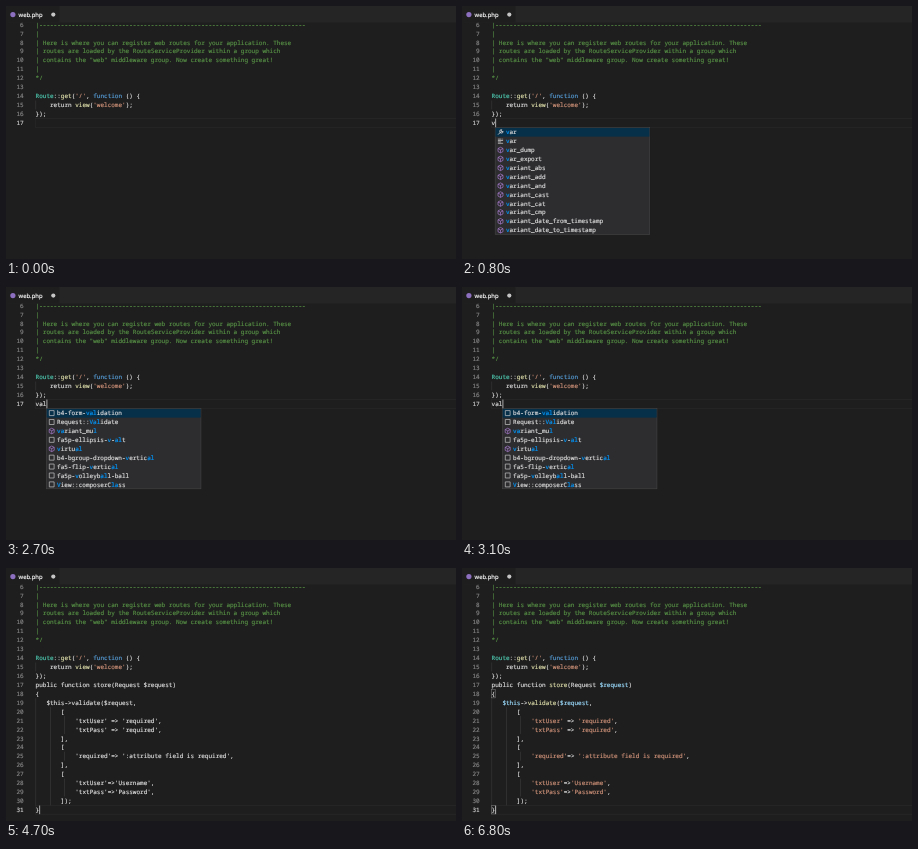
An HTML page for the animation above (6900 ms loop, 450x253 px).

```html
<!DOCTYPE html>
<html lang="en">
<head>
<meta charset="utf-8">
<title>Editor snippet</title>
<style>
html, body { margin: 0; width: 100%; height: 100%; overflow: hidden; background: #1e1e1e; }
svg { display: block; width: 100vw; height: 100vh; }
text { font: 6.01px "Noto Sans Mono", "DejaVu Sans Mono", monospace; white-space: pre; text-rendering: geometricPrecision; }
text, tspan { fill: currentColor; stroke: currentColor; stroke-width: 0.17px; }
.tab { font: 5.9px "Open Sans", "Noto Sans", sans-serif; }
</style>
</head>
<body>
<svg id="stage" viewBox="0 0 450 253"></svg>
<script>
const LOOP = 6900, LEFT = 29.6, CHAR = 3.606, ROW = 8.93;
const FG = '#dcdcdc', COMMENT = '#568f45', STRING = '#ce9178', GUIDE = '#404040';
const stage = document.getElementById('stage');

function add(parent, tag, attrs = {}, content) {
  const node = document.createElementNS('http://www.w3.org/2000/svg', tag);
  for (const key in attrs) node.setAttribute(key, attrs[key]);
  if (content !== undefined) node.textContent = content;
  parent.appendChild(node);
  return node;
}
const group = () => add(stage, 'g');
const rect = (parent, x, y, width, height, fill, more) =>
  add(parent, 'rect', { x, y, width, height, fill, ...more });
const mid = line => 18.6 + (line - 6) * ROW;
const col = n => LEFT + n * CHAR;
const show = (node, on) => node.setAttribute('visibility', on ? 'visible' : 'hidden');

function write(parent, x, y, parts) {
  const text = add(parent, 'text', { x, y });
  parts.forEach(([color, value]) => add(text, 'tspan', { color }, value));
}

const rules = [
  [/^'[^']*'/, () => STRING],
  [/^\$\w+/, () => '#9cdcfe'],
  [/^\w+/, (word, line) => {
    if (word === 'Route') return '#4ec9b0';
    if (/^(get|view|store|validate)$/.test(word)) return '#dcdcaa';
    if (word === 'function' && line === 14) return '#569cd6';
    return FG;
  }],
  [/^[^\w'$]+/, () => FG]
];

function tokens(source, line) {
  const parts = [];
  while (source) {
    const [pattern, color] = rules.find(([p]) => p.test(source));
    const value = source.match(pattern)[0];
    parts.push([color(value, line), value]);
    source = source.slice(value.length);
  }
  return parts;
}

function codeLine(parent, line, source, plainColor) {
  const code = source.trim();
  const parts = plainColor ? [[plainColor, code]] : tokens(code, line);
  write(parent, col(source.length - code.length), mid(line) + 2.1, parts);
}

function guide(parent, column, first, last) {
  rect(parent, col(column), mid(first) - ROW / 2, 0.5, (last - first + 1) * ROW, GUIDE);
}

function lineNumber(parent, line, color = '#858585') {
  add(parent, 'text', { x: 17.6, y: mid(line) + 2.1, 'text-anchor': 'end', color }, line);
}

function activeLine(parent, line) {
  rect(parent, LEFT - 0.3, mid(line) - 4.4, 430, 8.8, 'none', { stroke: '#292929', 'stroke-width': 0.7 });
  lineNumber(parent, line, '#d0d0d0');
}

// Base document
rect(stage, 0, 0, 450, 253, '#1e1e1e');
const base = group();
const opening = [
  '|' + '-'.repeat(74),
  '|',
  '| Here is where you can register web routes for your application. These',
  '| routes are loaded by the RouteServiceProvider within a group which',
  '| contains the "web" middleware group. Now create something great!',
  '|',
  '*/',
  '',
  "Route::get('/', function () {",
  "    return view('welcome');",
  '});'
];
opening.forEach((source, i) => {
  lineNumber(base, i + 6);
  if (source) codeLine(base, i + 6, source, i < 7 && COMMENT);
});
guide(base, 0, 15, 15);

// Line being typed
const typing = group();
activeLine(typing, 17);
const typed = add(typing, 'text', { x: LEFT, y: mid(17) + 2.1, color: FG });

// Inserted snippet: plain at first, coloured once parsed
const snippet = group(), plain = group(), colored = group();
activeLine(snippet, 31);
guide(snippet, 0, 19, 30);
guide(snippet, 4, 20, 30);
[[21, 22], [25, 25], [28, 29]].forEach(([a, b]) => guide(snippet, 8, a, b));
const body = [
  'public function store(Request $request)',
  '{',
  '   $this->validate($request,',
  '       [',
  "           'txtUser' => 'required',",
  "           'txtPass' => 'required',",
  '       ],',
  '       [',
  "           'required'=> ':attribute field is required',",
  '       ],',
  '       [',
  "           'txtUser'=>'Username',",
  "           'txtPass'=>'Password',",
  '       ]);',
  '}'
];
body.forEach((source, i) => {
  if (i < body.length - 1) lineNumber(snippet, i + 17);
  codeLine(plain, i + 17, source, FG);
  codeLine(colored, i + 17, source);
});
[18, 31].forEach(line => rect(colored, LEFT, mid(line) - 4.1, CHAR, 8.2, 'none',
  { stroke: '#888888', 'stroke-width': 0.5 }));

// Tab bar
rect(stage, 0, 0, 450, 16.5, '#252526');
rect(stage, 0, 0, 53.5, 16.5, '#1e1e1e');
add(stage, 'circle', { cx: 6.9, cy: 8.6, r: 2.6, fill: '#8d6fc0' });
add(stage, 'text', { x: 12.6, y: 10.8, color: '#ffffff', class: 'tab' }, 'web.php');
add(stage, 'circle', { cx: 47.3, cy: 8.6, r: 2.1, fill: '#c5c5c5' });

// Suggestion lists; matched letters are wrapped in <>
const icons = {
  wrench: ['M-2.4 2.4L.4-.4M1.2-2.5A1.7 1.7 0 1 0 2.6-.9L1.3-.3.5-1.1Z', '#d0d0d0', 0.9],
  keyword: ['M-2.6-2H1M-2.6-.6H2.6M-2.6.8H.6M-2.6 2.2H2.6M1.8-2H2.6', '#c5c5c5', 0.8],
  cube: ['M0-2.8L2.5-1.5V1.5L0 2.8L-2.5 1.5V-1.5ZM-2.5-1.5L0-.2L2.5-1.5M0-.2V2.8', '#b180d7', 0.65],
  box: ['M-2.4-2.6H2.4V2.4H-2.4Z', '#c5c5c5', 0.7]
};

function popup(column, items) {
  const g = group(), x = col(column), top = 121.6;
  rect(g, x, top, 154.5, items.length * 8.91, '#2d2d30', { stroke: '#454545', 'stroke-width': 0.6 });
  rect(g, x + 0.3, top + 0.3, 153.9, 8.7, '#062f4a');
  items.forEach(([icon, label], i) => {
    const y = top + 4.6 + i * 8.91;
    const [d, stroke, width] = icons[icon];
    add(g, 'path', { d, stroke, fill: 'none', 'stroke-width': width, transform: `translate(${x + 5.3} ${y})` });
    const parts = label.split(/[<>]/).map((value, n) => [n % 2 ? '#0097fb' : FG, value]);
    write(g, x + 10.7, y + 2.1, parts);
  });
  return g;
}

const functions = ['var_dump', 'var_export', 'variant_abs', 'variant_add', 'variant_and', 'variant_cast',
  'variant_cat', 'variant_cmp', 'variant_date_from_timestamp', 'variant_date_to_timestamp'];
const varList = (prefix, order) => [
  ...order.map(icon => [icon, 'var']),
  ...functions.map(name => ['cube', name])
].map(([icon, name]) => [icon, `<${prefix}>${name.slice(prefix.length)}`]);

const popups = [
  popup(1, varList('v', ['wrench', 'keyword'])),
  popup(2, varList('va', ['keyword', 'wrench'])),
  popup(3, [
    ['box', 'b4-form-<val>idation'],
    ['box', 'Request::<Val>idate'],
    ['cube', '<va>riant_mu<l>'],
    ['box', 'fa5p-ellipsis-<v>-<al>t'],
    ['cube', '<v>irtu<al>'],
    ['box', 'b4-bgroup-dropdown-<v>ertic<al>'],
    ['box', 'fa5-flip-<v>ertic<al>'],
    ['box', 'fa5p-<v>olleyb<al>l-ball'],
    ['box', '<V>iew::composerC<la>ss']
  ]),
  popup(4, [
    ['box', 'b4-form-<vali>dation'],
    ['box', 'Request::<Vali>date'],
    ['cube', '<va>r<i>ant_mu<l>']
  ])
];
rect(popups[1], col(2) + 149.3, 122, 5, 21.5, '#4f4f51');

const caret = rect(stage, 0, 0, 0.8, 8.6, '#d0d0d0');

// Each keystroke restarts the caret blink
const keys = [-500, 800, 1300, 2700, 3300, 4600];
const PARSED = 5200;

function draw(t) {
  const step = keys.filter(at => at <= t).length - 1;
  const done = step === 5;
  show(typing, !done);
  show(snippet, done);
  show(plain, done && t < PARSED);
  show(colored, t >= PARSED);
  typed.textContent = 'vali'.slice(0, Math.min(step, 4));
  popups.forEach((list, i) => show(list, step === i + 1));
  const blinkOn = Math.floor((t - keys[step]) / 500) % 2 === 0;
  caret.setAttribute('x', col(done ? 1 : step) + 0.1);
  caret.setAttribute('y', mid(done ? 31 : 17) - 4.3);
  show(caret, blinkOn);
}

const start = performance.now();
function tick() {
  draw((performance.now() - start) % LOOP);
  requestAnimationFrame(tick);
}
draw(0);
requestAnimationFrame(tick);
</script>
</body>
</html>
```
